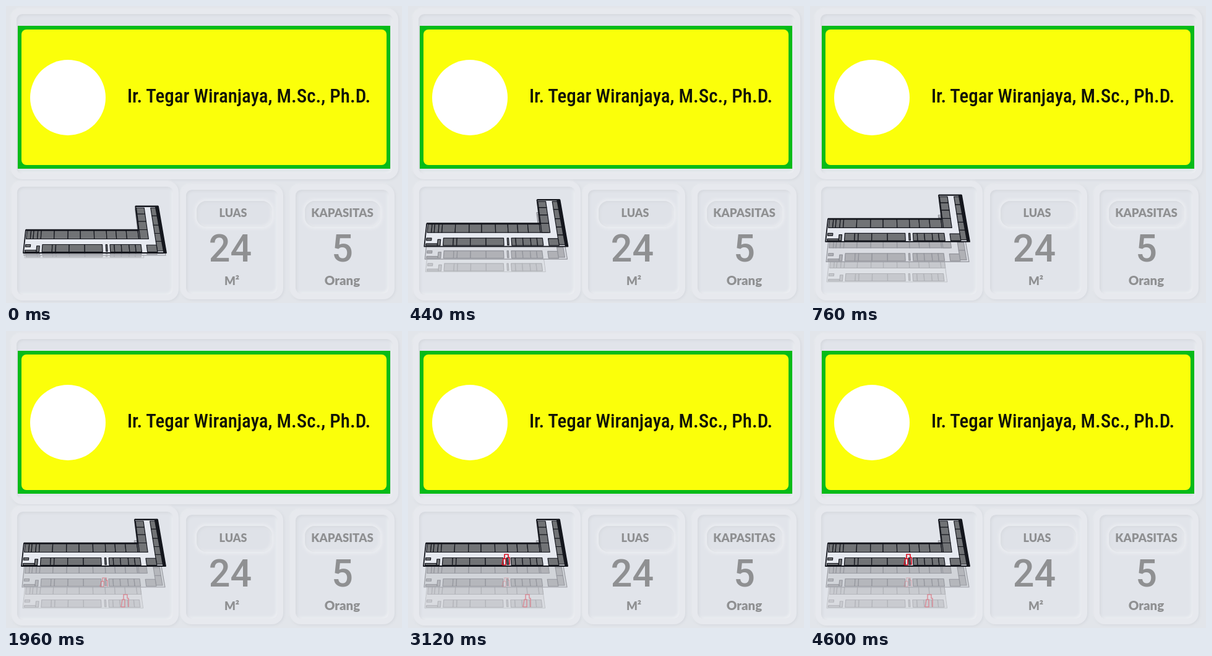
Animation, 640 px wide and 480 px high, one loop 5.12 s. Source, as an HTML page with a canvas:

```html
<!DOCTYPE html>
<html lang="id">
<head>
<meta charset="utf-8">
<title>Ruang</title>
<style>
html, body { margin: 0; width: 100%; height: 100%; overflow: hidden; background: #e2e5ea; }
#stage { position: relative; width: 640px; height: 480px; overflow: hidden; background: #e2e5ea; }
#stage > * { position: absolute; box-sizing: border-box; }
.ring { border: 9px solid #e7e9ee; border-radius: 18px; background: #e1e4ea;
  box-shadow: 1px 1px 4px #d3d6dc, -1px -1px 3px #eff1f4,
    inset 2px 2px 4px #d5d8de, inset -2px -2px 4px #eff1f4; }
.pill { border-radius: 16px; background: #dfe2e8;
  box-shadow: 0 0 5px 3px #ebedf1, inset 2px 2px 4px #d8dbe0, inset -2px -2px 4px #e9ebef; }
.board { left: 19px; top: 32px; width: 602px; height: 231px; background: #06bb18; }
.plate { left: 25px; top: 38px; width: 590px; height: 219px; background: #fbff0a; border-radius: 8px; }
.seal { left: 39px; top: 87px; width: 122px; height: 122px; border-radius: 50%; background: #fff; }
.text { white-space: nowrap; line-height: 1; }
.name { left: 196px; top: 130px; font: 500 31px/1 "Roboto Condensed", Roboto, sans-serif;
  font-stretch: 75%; color: #111408; }
.mid { transform: translateX(-50%); color: #8f9092; }
.label { font: 900 18.7px/1 Lato, sans-serif; }
.num { font: 500 61px/1 Roboto, sans-serif; }
canvas { left: 0; top: 280px; }
</style>
</head>
<body>
<div id="stage">
  <div class="ring" style="left:8px;top:4px;width:626px;height:276px"></div>
  <div class="board"></div>
  <div class="plate"></div>
  <div class="seal"></div>
  <div class="text name">Ir. Tegar Wiranjaya, M.Sc., Ph.D.</div>
  <div class="ring" style="left:9px;top:283px;width:270px;height:193px"></div>
  <div class="ring" style="left:282px;top:288px;width:166px;height:186px"></div>
  <div class="ring" style="left:459px;top:288px;width:169px;height:186px"></div>
  <div class="pill" style="left:308px;top:315px;width:122px;height:42px"></div>
  <div class="pill" style="left:483px;top:315px;width:122px;height:42px"></div>
  <div class="text mid label" style="left:367px;top:325px;font-size:18px">LUAS</div>
  <div class="text mid label" style="left:543.5px;top:325px">KAPASITAS</div>
  <div class="text mid num" style="left:362.5px;top:362px">24</div>
  <div class="text mid num" style="left:543.5px;top:362px">5</div>
  <div class="text mid label" style="left:365px;top:435px">M²</div>
  <div class="text mid label" style="left:543.5px;top:433px;font-size:20.5px">Orang</div>
  <canvas id="plan" width="280" height="190"></canvas>
</div>
<script>
const LOOP = 5120, RISE = 800, MARK = 1960, MARKED = 2480, TOP_Y = 280;
const ctx = document.getElementById('plan').getContext('2d');
const mix = (a, b, k) => a + (b - a) * k;
const part = (t, a, b) => Math.min(1, Math.max(0, (t - a) / (b - a)));

const TOP = { fill: '#717376', line: '#14161d', hall: '#e6e9f0', slab: 3 };
const MID = { fill: '#b0b1b6', line: '#92949b', hall: '#dadce2', slab: 2 };
const LOW = { fill: '#c6c8cd', line: '#b0b2b7', hall: '#dee1e6', slab: 1 };

// Wall positions along each wing, in plan space.
const FRONT = [.13, .2, .225, .32, .43, .555];
const FRONT2 = [.61, .64, .69, .745, .79, .83];
const BACK = [.01, .04, .06, .09, .115, .21, .31, .4, .5, .59, .66, .735, .82, .88];
const WING = [.3, .5, .68, .84, .97];
const EAST = [.04, .25, .42, .6, .8, .97];

function point(s, u, v) {
  return [mix(s.left + 8 * v, s.right - 13 * v, u), s.y - 75 * v - TOP_Y];
}
function shape(s, pts, dy = 0) {
  ctx.beginPath();
  for (const [u, v] of pts) {
    const [x, y] = point(s, u, v);
    ctx.lineTo(x, y + dy);
  }
  ctx.closePath();
}
function room(s, c, u0, u1, v0, v1) {
  shape(s, [[u0, v0], [u1, v0], [u1, v1], [u0, v1]]);
  ctx.fillStyle = c.fill;
  ctx.fill();
  ctx.stroke();
}
const pairs = (list, fn) => list.slice(1).forEach((b, i) => fn(list[i], b));

function floor(s, c, full) {
  const edge = full
    ? [[0, 0], [1, 0], [1, 1], [.825, 1], [.825, .49], [0, .49]]
    : [[0, 0], [.85, 0], [.85, .49], [0, .49]];
  ctx.lineJoin = 'round';
  ctx.strokeStyle = ctx.fillStyle = c.line;
  shape(s, edge, -c.slab / 2);
  ctx.fill();
  shape(s, edge);
  ctx.fillStyle = c.hall;
  ctx.fill();
  ctx.lineWidth = 1.2;
  pairs(FRONT, (a, b) => room(s, c, a, b, .02, .18));
  pairs(FRONT2, (a, b) => room(s, c, a, b, .02, .18));
  room(s, c, .01, .09, .02, .06);
  room(s, c, .09, .11, .02, .15);
  room(s, c, .01, .045, .13, .18);
  room(s, c, .58, .59, .03, .18);
  pairs(BACK, (a, b) => room(s, c, a, Math.min(b, full ? 1 : .85), .3, .48));
  if (full) {
    pairs(WING, (a, b) => room(s, c, .83, .89, a, b));
    pairs(EAST, (a, b) => room(s, c, .94, .985, a, b));
    room(s, c, .87, .94, .02, .17);
  }
  ctx.lineWidth = c.slab * .6;
  shape(s, edge);
  ctx.stroke();
  if (c === TOP) {
    ctx.fillStyle = c.line;
    shape(s, [[.98, 0], [1, 0], [1, 1], [.975, 1]]);
    ctx.fill();
  }
}

function route(x, y, h, color, alpha, width) {
  const line = pts => pts.forEach(([px, py], i) =>
    ctx[i ? 'lineTo' : 'moveTo'](x + px, y - TOP_Y + h * (py - 1)));
  ctx.globalAlpha = alpha;
  ctx.strokeStyle = color;
  ctx.lineWidth = width;
  ctx.beginPath();
  line([[-6, 1], [-4, .4], [0, .4], [0, 1], [-6, 1]]);
  line([[-2, .4], [-2, 0], [4, 0], [4, .3], [6, .3], [6, 1]]);
  ctx.stroke();
  ctx.globalAlpha = 1;
}

function draw(t) {
  const k = part(t, 0, RISE), m = part(t, MARK, MARKED);
  const y = mix(399, 380, k);
  const left = mix(28, 25, k), right = mix(259, 258, k);
  const step = mix(4, 34, k);
  ctx.clearRect(0, 0, 280, TOP_Y);
  ctx.globalAlpha = mix(1, .85, part(t, 800, 1000));
  floor({ left: left + 2, right: right - 2, y: y + 2 * step }, LOW, false);
  floor({ left: left + 1, right: right - 1, y: y + step }, MID, true);
  ctx.globalAlpha = 1;
  if (t >= MARK) {
    route(192, 446, 20, '#dc7c88', .8, 1.5);
    route(158, 413, 14, '#dc5f6c', mix(.7, .35, m), 1.2);
  }
  floor({ left, right, y }, TOP, true);
  if (m > 0) route(158, 378, 17, '#d91526', m, 1.7);
}

function tick(now) {
  draw(now % LOOP);
  requestAnimationFrame(tick);
}
draw(0);
requestAnimationFrame(tick);
</script>
</body>
</html>
```
